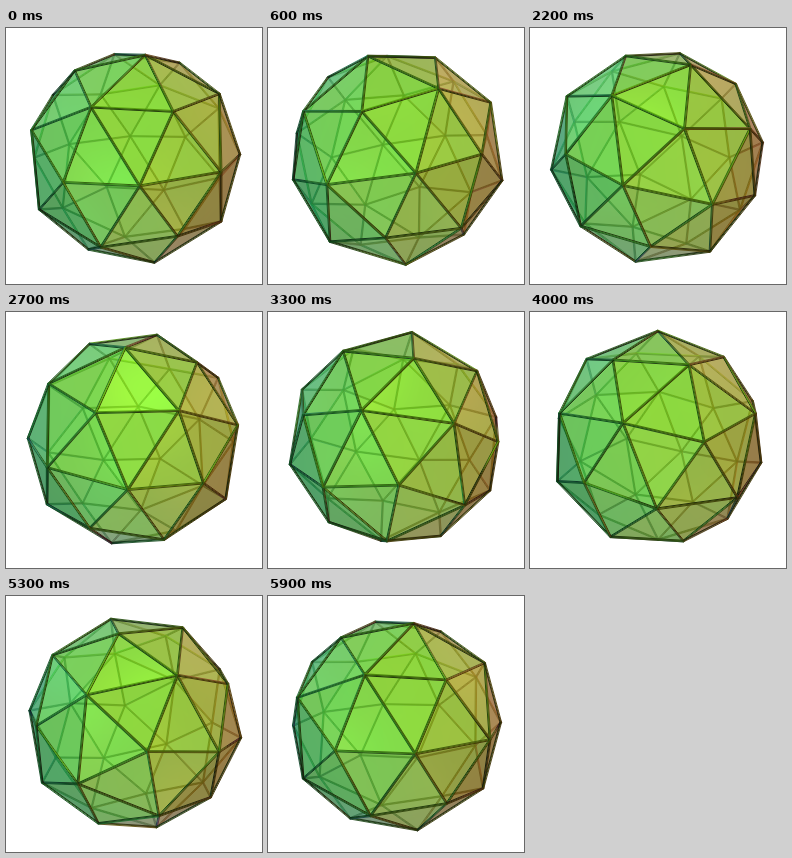
Animation of 256x256 px, one loop 6000 ms. Source, as an HTML page with a canvas:

```html
<!DOCTYPE html>
<html lang="en">
<head>
<meta charset="utf-8">
<title>Rotating pentakis dodecahedron</title>
<style>
  html, body { margin: 0; width: 100%; height: 100%; overflow: hidden; background: #fff; }
  canvas { display: block; }
</style>
</head>
<body>
<canvas id="stage" width="256" height="256"></canvas>
<script>
const SIZE = 256, ZOOM = 512, EYE = 4.8, EDGE = 0.01, TAU = Math.PI * 2;
const STEPS = 60, STEP_MS = 100;
const CLEAR = 0.4; // share of light a face lets through
const FACE_DIFFUSE = 0.64, FACE_PHONG = 0.2, EDGE_DIFFUSE = 0.45, EDGE_PHONG = 1;
const ctx = document.getElementById('stage').getContext('2d', { willReadFrequently: true });

const dot = (a, b) => a[0] * b[0] + a[1] * b[1] + a[2] * b[2];
const cross = (a, b) => [a[1] * b[2] - a[2] * b[1], a[2] * b[0] - a[0] * b[2], a[0] * b[1] - a[1] * b[0]];
const add = (a, b) => [a[0] + b[0], a[1] + b[1], a[2] + b[2]];
const sub = (a, b) => [a[0] - b[0], a[1] - b[1], a[2] - b[2]];
const scale = (a, k) => [a[0] * k, a[1] * k, a[2] * k];
const unit = a => scale(a, 1 / Math.hypot(...a));
const mix = (a, b, k) => a.map((v, i) => v + (b[i] - v) * k);

// Vertices: a dodecahedron plus a slightly lower apex over each of its faces
const PHI = (1 + Math.sqrt(5)) / 2, SIGNS = [-1, 1], vertices = [];
const addCyclic = (a, b, radius) => {
  for (const s of SIGNS) for (const t of SIGNS) {
    const [x, y, z] = scale(unit([0, s * a, t * b]), radius);
    vertices.push([x, y, z], [y, z, x], [z, x, y]);
  }
};
for (const x of SIGNS) for (const y of SIGNS) for (const z of SIGNS) vertices.push(unit([x, y, z]));
addCyclic(PHI, 1 / PHI, 1);
addCyclic(1, PHI, 0.97415);

const near = (i, j) => Math.hypot(...sub(vertices[i], vertices[j])) < 0.75;
const edges = [], faces = [];
for (let i = 0; i < 32; i++) for (let j = i + 1; j < 32; j++) {
  if (!near(i, j)) continue;
  edges.push([i, j]);
  for (let k = j + 1; k < 32; k++) if (near(i, k) && near(j, k)) faces.push([i, j, k]);
}

// A ring of coloured lights; the first one counts twice
const lights = Array.from({ length: 12 }, (_, i) => {
  const a = i * TAU / 11;
  return {
    at: [4 * Math.sin(a), 5 * Math.cos(3 * a), -4 * Math.cos(a)],
    colour: [0, 1, 2].map(c => (1 + Math.sin(a + c * TAU / 3)) * 2 / 11)
  };
});

// Light reaching p; lamps behind the outward side are dimmed by the body
function shade(p, normal, outward, ray, diffuse, phong, dim) {
  const rgb = [0, 0, 0], mirror = 2 * dot(ray, normal);
  const rx = ray[0] - mirror * normal[0], ry = ray[1] - mirror * normal[1], rz = ray[2] - mirror * normal[2];
  for (const { at, colour } of lights) {
    const x = at[0] - p[0], y = at[1] - p[1], z = at[2] - p[2];
    const facing = normal[0] * x + normal[1] * y + normal[2] * z;
    if (facing <= 0) continue;
    const len = Math.sqrt(x * x + y * y + z * z);
    const shine = (rx * x + ry * y + rz * z) / len;
    let k = diffuse * facing / len;
    if (shine > 0.85) k += phong * shine ** 40;
    if (outward[0] * x + outward[1] * y + outward[2] * z < 0) k *= dim;
    for (let c = 0; c < 3; c++) rgb[c] += k * colour[c];
  }
  return rgb;
}

const turnY = ([x, y, z], a) => {
  const c = Math.cos(a), s = Math.sin(a);
  return [x * c + z * s, y, z * c - x * s];
};
const turnX = ([x, y, z], a) => {
  const c = Math.cos(a), s = Math.sin(a);
  return [x, y * c - z * s, y * s + z * c];
};
const TILT = Math.acos(1 - 2 * 0.867397);
const pose = (v, clock) => turnY(turnX(turnY(v, 0.139009 * TAU), TILT), (0.887589 + clock) * TAU);
const project = ([x, y, z]) => [SIZE / 2 + ZOOM * x / (z + EYE), SIZE / 2 - ZOOM * y / (z + EYE)];
const rayTo = p => unit([p[0], p[1], p[2] + EYE]);

// Colour of a round edge at p, q radii away from its middle line
function edgeColour(p, along, q, dim) {
  const ray = rayTo(p), side = unit(cross(along, ray)), front = cross(along, side);
  const facing = dot(front, ray) > 0 ? -1 : 1;
  const sum = [0, 0, 0];
  for (const s of [q - 0.2, q + 0.2]) {
    const normal = add(scale(side, s), scale(front, facing * Math.sqrt(1 - s * s)));
    shade(p, normal, p, ray, EDGE_DIFFUSE, EDGE_PHONG, dim).forEach((v, c) => sum[c] += v * 127.5);
  }
  return `rgb(${sum.map(v => Math.min(255, Math.round(v))).join()})`;
}

// Three parallel strips give the edge its round shading
function drawEdge(a, b, dim) {
  const along = unit(sub(b, a)), middle = mix(a, b, 0.5);
  const side = unit(cross(along, rayTo(middle)));
  ctx.lineWidth = 0.8 * EDGE * ZOOM / (middle[2] + EYE);
  for (const q of [-2 / 3, 2 / 3, 0]) {
    const shift = scale(side, q * EDGE);
    const from = project(add(a, shift)), to = project(add(b, shift));
    const paint = ctx.createLinearGradient(...from, ...to);
    for (let k = 0; k <= 1; k += 0.25) paint.addColorStop(k, edgeColour(mix(a, b, k), along, q, dim));
    ctx.strokeStyle = paint;
    ctx.beginPath();
    ctx.moveTo(...from);
    ctx.lineTo(...to);
    ctx.stroke();
  }
}

function draw(clock) {
  const points = vertices.map(v => pose(v, clock));
  const frontEdges = new Set();
  const planes = faces.map(face => {
    const [a, b, c] = face.map(i => points[i]);
    let n = unit(cross(sub(b, a), sub(c, a)));
    if (dot(n, a) < 0) n = scale(n, -1);
    const gap = dot(n, a) + n[2] * EYE;
    if (gap < 0) for (const i of face) for (const j of face) frontEdges.add(i + ',' + j);
    return { n, gap };
  });

  ctx.fillStyle = '#fff';
  ctx.fillRect(0, 0, SIZE, SIZE);
  let image = ctx.getImageData(0, 0, SIZE, SIZE);
  const front = new Float32Array(SIZE * SIZE * 3), inside = [];
  for (let py = 0; py < SIZE; py++) for (let px = 0; px < SIZE; px++) {
    const u = (px + 0.5 - SIZE / 2) / ZOOM, v = (SIZE / 2 - py - 0.5) / ZOOM;
    if (u * u + v * v > 0.0455) continue;
    let enter = 0, leave = 99, first, last;
    for (const plane of planes) {
      const n = plane.n, slope = n[0] * u + n[1] * v + n[2], t = plane.gap / slope;
      if (slope < 0) { if (t > enter) { enter = t; first = n; } }
      else if (t < leave) { leave = t; last = n; }
    }
    if (enter >= leave) continue;
    const ray = unit([u, v, 1]), i = py * SIZE + px;
    const hit = t => [u * t, v * t, t - EYE];
    const outer = shade(hit(enter), first, first, ray, FACE_DIFFUSE, FACE_PHONG, 1);
    const inner = shade(hit(leave), scale(last, -1), last, ray, FACE_DIFFUSE, FACE_PHONG, CLEAR);
    inside.push(i);
    for (let c = 0; c < 3; c++) {
      front[i * 3 + c] = outer[c] * 255;
      image.data[i * 4 + c] = (inner[c] + CLEAR) * 255;
    }
  }
  ctx.putImageData(image, 0, 0);

  ctx.lineCap = 'round';
  const drawEdges = (isFront, dim) => {
    for (const [i, j] of edges)
      if (frontEdges.has(i + ',' + j) === isFront) drawEdge(points[i], points[j], dim);
  };
  drawEdges(false, CLEAR);
  image = ctx.getImageData(0, 0, SIZE, SIZE);
  for (const i of inside) for (let c = 0; c < 3; c++)
    image.data[i * 4 + c] = image.data[i * 4 + c] * CLEAR + front[i * 3 + c];
  ctx.putImageData(image, 0, 0);
  drawEdges(true, CLEAR * CLEAR);
}

const start = performance.now();
let shown = -1;
function tick() {
  const step = Math.floor((performance.now() - start) / STEP_MS) % STEPS;
  if (step !== shown) draw((shown = step) / STEPS);
  requestAnimationFrame(tick);
}
tick();
</script>
</body>
</html>
```
